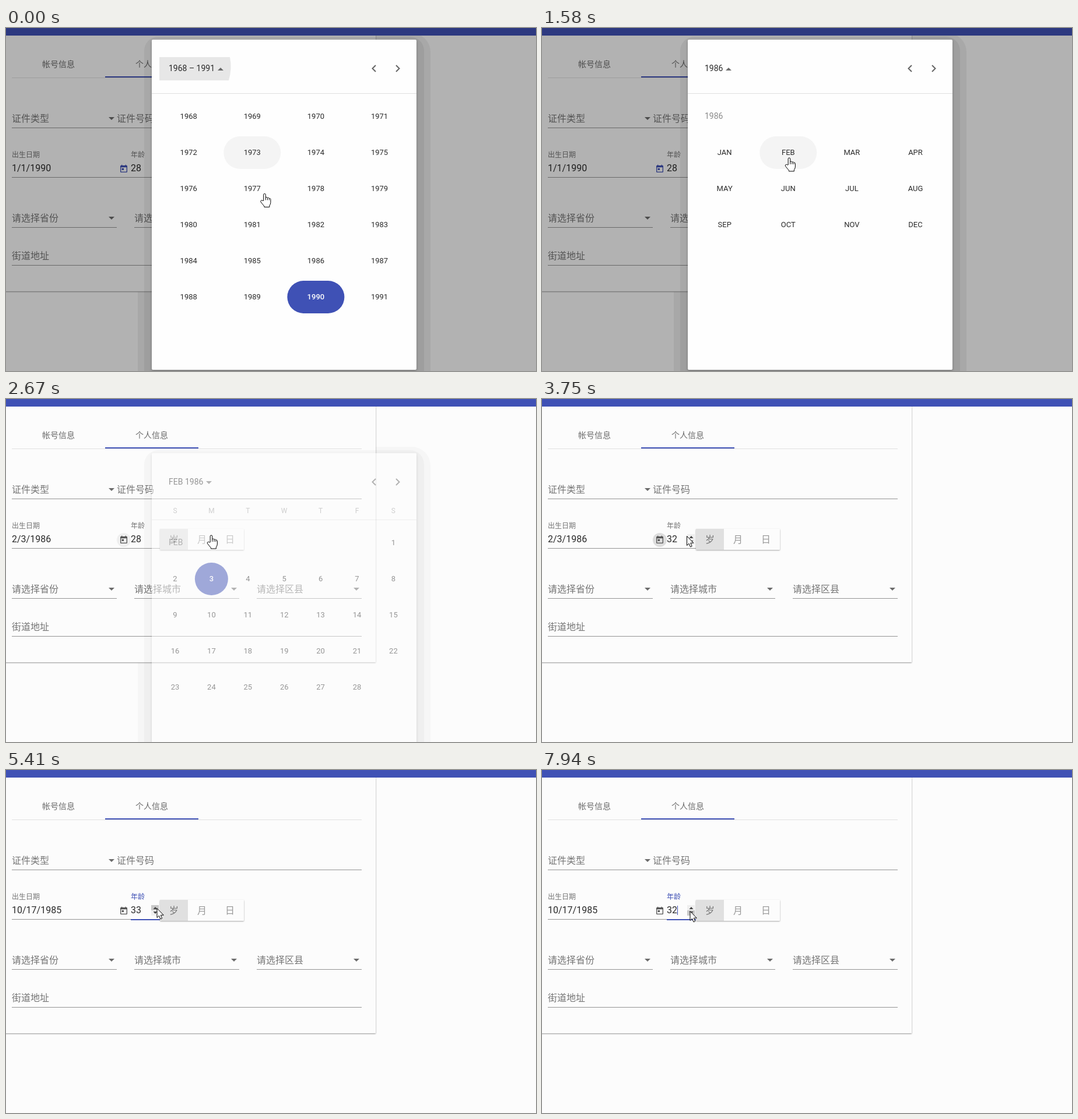
Write an HTML page that moves like this. It is 909x589 px and loops after 8 s.

```html
<!DOCTYPE html>
<html lang="zh">
<head>
<meta charset="utf-8">
<style>
html, body { margin: 0; width: 100%; height: 100%; overflow: hidden; background: #fcfcfc; }
svg { display: block; width: 909px; height: 589px; }
text { font-family: Roboto, "Noto Sans CJK SC", "Noto Sans CJK", sans-serif; white-space: pre; }
.cjk { font-family: "Noto Sans CJK SC", "Noto Sans CJK", sans-serif; font-weight: 300; }
.card { filter: drop-shadow(0 1px 1px rgba(0,0,0,.42)); }
.toggle { filter: drop-shadow(0 1px 1px rgba(0,0,0,.34)); }
.sheet { filter: drop-shadow(0 2px 2px rgba(0,0,0,.25)); }
</style>
</head>
<body>
<svg id="stage" viewBox="0 0 909 589"></svg>
<script>
const LOOP = 8000, BLUE = '#3f51b5', INK = '#2b2b2b', GREY = '#757575', LINE = '#949494';
const MONTHS = 'JAN FEB MAR APR MAY JUN JUL AUG SEP OCT NOV DEC'.split(' ');

// Markup helpers
const rect = (x, y, w, h, fill, extra = '') =>
  `<rect x="${x}" y="${y}" width="${w}" height="${h}" fill="${fill}" ${extra}/>`;
const label = (x, y, s, size, fill, extra = '') =>
  `<text x="${x}" y="${y}" font-size="${size}" fill="${fill}" ${extra}>${s}</text>`;
const cjk = (x, y, s, size = 16, fill = GREY, extra = '') =>
  label(x, y, s, size, fill, `class="cjk" ${extra}`);
const mid = (x, y, s, size = 13, fill = INK, extra = '') =>
  label(x, y, s, size, fill, `text-anchor="middle" ${extra}`);
const tri = (x, y, r, h, fill = '#6b6b6b') =>
  `<path d="M${x - r} ${y}h${2 * r}l${-r} ${h}z" fill="${fill}"/>`;
const pill = (x, y, w, fill, extra = '') =>
  rect(x - w / 2, y - 28, w, 56, fill, `rx="28" ${extra}`);
const range = (n, fn) => Array.from({ length: n }, (_, i) => fn(i)).join('');

const wideX = i => 313.2 + 109.1 * (i % 4);
const dayX = i => 290 + 62.4 * (i % 7);
const rowY = (first, i, cols) => first + 62 * Math.floor(i / cols);

const select = (x, w, y, s) =>
  cjk(x, y - 10, s) + rect(x, y, w, 1, LINE) + tri(x + 171, y - 18, 5, 5);

const form = `
  ${rect(-20, -10, 654, 462, '#fcfcfc', 'class="card"')}
  ${rect(0, 0, 909, 13, BLUE)}
  ${cjk(62, 67, '帐号信息', 14, '#6c6c6c')}${cjk(222, 67, '个人信息', 14, '#6c6c6c')}
  ${rect(10, 85, 600, 1, '#e0e0e0')}${rect(170, 83, 160, 2, BLUE)}
  ${select(10, 180, 171, '证件类型')}
  ${cjk(190, 161, '证件号码')}${rect(190, 171, 420, 1, LINE)}
  ${cjk(10, 222, '出生日期', 12)}${cjk(214, 222, '年龄', 12, GREY, 'id="ageLabel"')}
  ${rect(10, 256, 254, 1, LINE)}
  ${rect(214, 256, 50, 2, BLUE, 'id="focusLine"')}
  ${label(10, 246, '', 16, INK, 'id="birth"')}${label(214, 246, '', 16, INK, 'id="age"')}
  <circle id="iconHalo" cx="202" cy="242" r="12"/>
  <path id="icon" transform="translate(194 234) scale(.667)" d="M19 3h-1V1h-2v2H8V1H6v2H5q-2 0-2 2v14q0 2 2 2h14q2 0 2-2V5q0-2-2-2zm0 16H5V8h14zM7 10h5v5H7z"/>
  ${rect(232, 233, 1, 16, BLUE, 'id="caret"')}
  <g id="spinner">
    ${rect(249, 232, 13, 18, '#efefef')}
    ${rect(249, 232, 13, 9, '#c8c8c8', 'id="spinHover"')}
    ${tri(256, 239, 3.5, -4, '#444')}${tri(256, 243, 3.5, 4, '#444')}
  </g>
  ${rect(264, 223, 144, 36, '#fcfcfc', 'rx="1" class="toggle"')}
  ${rect(264, 223, 48, 36, '#e0e0e0')}
  ${cjk(280, 247, '岁')}${cjk(328, 247, '月', 16, '#999')}${cjk(376, 247, '日', 16, '#999')}
  ${select(10, 180, 342, '请选择省份')}
  ${select(220, 180, 342, '请选择城市')}
  ${select(430, 180, 342, '请选择区县')}
  ${cjk(10, 397, '街道地址')}${rect(10, 407, 600, 1, LINE)}`;

const yearsView = `
  ${pill(wideX(2), 462, 98, BLUE)}
  ${label(279, 74, '1968 – 1991', 14, INK)}${tri(368, 73, 5, -5)}
  ${rect(250, 112, 454, 1, '#e0e0e0')}
  ${range(24, i => mid(wideX(i), rowY(156, i, 4), 1968 + i, 13,
    i === 22 ? '#fff' : INK, i === 22 ? 'font-weight="500"' : ''))}`;

const monthsView = `
  ${label(279, 74, '1986', 14, INK)}${tri(320, 73, 5, -5)}
  ${rect(250, 112, 454, 1, '#e0e0e0')}
  ${label(279, 156, '1986', 14, '#8a8a8a')}
  ${range(12, i => mid(wideX(i), rowY(218, i, 4), MONTHS[i]))}`;

const daysView = `
  ${pill(dayX(1), 236, 57, BLUE, 'id="picked"')}
  ${label(279, 74, 'FEB 1986', 14, INK)}${tri(348, 68, 5, 5)}
  ${range(7, i => mid(dayX(i), 123, 'SMTWTFS'[i], 12, '#9e9e9e'))}
  ${rect(250, 134, 454, 1, '#e0e0e0')}
  ${label(279, 178, 'FEB', 14, '#808080')}
  ${range(28, i => mid(dayX(i + 6), rowY(178, i + 6, 7), i + 1, 13, INK, i === 2 ? 'id="third"' : ''))}`;

const picker = `
  <g id="dialog">
    <g clip-path="url(#offCard)"><g class="slide">
      ${rect(226, 9, 502, 660, '#000', 'rx="32" opacity=".055"')}
    </g></g>
    <g class="slide">
      ${rect(237, 15, 480, 640, '#000', 'rx="24" opacity=".06"')}
      ${rect(250, 20, 454, 567, '#fefefe', 'rx="2" class="sheet"')}
      <path id="ripple" d="M263 50H384Q388 70 382 90H263Z" fill="#e7e7e7"/>
      ${pill(0, 0, 98, '#f4f4f4', 'id="hover"')}
      <g id="years">${yearsView}</g>
      <g id="months">${monthsView}</g>
      <g id="days">${daysView}</g>
      <path d="M634 64l-5.5 5.5 5.5 5.5M669 64l5.5 5.5-5.5 5.5" fill="none" stroke="#666" stroke-width="2"/>
    </g>
  </g>`;

const cursors = `
  <g id="cursor" fill="#fff" stroke="#000" stroke-linejoin="round">
    <g id="hand">
      <path d="M-1.8 12V1.8a1.8 1.8 0 0 1 3.6 0V7a1.7 1.7 0 0 1 3.2.6a1.6 1.6 0 0 1 2.9.9a1.5 1.5 0 0 1 2.5 1.2V15q0 3-2 5.5V23H-.6V21.5L-6.3 14.5q-1.2-1.8.3-2.8t2.7.3Z"/>
      <path d="M1.8 7v4M5 8v3M7.9 9v2" fill="none"/>
    </g>
    <path id="arrow" d="M.5.5V16.5L4 13.2 6.5 19 9.2 17.8 6.8 12.2H11.8Z"/>
  </g>`;

document.getElementById('stage').innerHTML = `
  <defs><clipPath id="offCard"><path d="M634 13H909V589H0V453H634Z"/></clipPath></defs>
  ${rect(0, 0, 909, 589, '#fcfcfc')}${form}
  ${rect(0, 0, 909, 589, '#000', 'id="backdrop" opacity=".295"')}
  ${picker}${cursors}`;

const $ = id => document.getElementById(id);
const set = (id, name, value) => $(id).setAttribute(name, value);
const show = (id, on) => set(id, 'display', on ? 'inline' : 'none');
const slides = document.querySelectorAll('.slide');

// Timelines: [start, ...values]; each entry holds until the next
const births = [[0, '1/1/1990'], [2670, '2/3/1986'], [5010, '10/17/1985'], [6360, '10/17/1986'], [7430, '10/17/1985']];
const ages = [[0, 28], [2790, 32], [4460, 33], [5840, 32], [6780, 33], [7820, 32]];
const views = [[0, 'years'], [1000, 'months'], [2130, 'days']];
const hovers = [
  [0, wideX(1), 214, 98], [150, wideX(1), 276, 98], [290, 0, 0, 0],
  [740, wideX(2), 400, 98], [1000, 0, 0, 0], [1440, wideX(1), 214, 98],
  [2130, dayX(2), 236, 57], [2385, 0, 0, 0], [2520, dayX(1), 236, 57], [2670, 0, 0, 0]];
const ripples = [[0, 1], [150, .6], [290, .25], [430, 0]];
const closing = [[0, 0], [2670, .515], [2790, .93], [2910, 1]];
const spinRows = [[0, -1], [4030, 0], [5530, 1], [6500, 0], [7560, 1]];
const focus = [[0, 0], [4460, .5], [4600, 1]];
const hold = (list, t) => list.findLast(e => t >= e[0]);

// Pointer legs: first step, last step, step count, destination
const legs = [
  [150, 430, 3, 536, 391], [1160, 1580, 4, 424, 223], [1730, 1730, 1, 423, 222],
  [2250, 2520, 3, 352, 234], [3180, 3750, 5, 248, 235], [4030, 4180, 2, 258, 235],
  [5410, 5410, 1, 258.5, 237], [5530, 5530, 1, 255, 243],
  [6500, 6640, 2, 255, 236], [7560, 7690, 2, 253.5, 242]];

function pointer(t) {
  let x = 443.5, y = 284.5;
  for (const [start, end, count, toX, toY] of legs) {
    if (t < start) break;
    const gap = (end - start) / (count - 1) || 1;
    const p = Math.min(1, (1 + Math.floor((t - start) / gap + .001)) / count);
    const ease = p * p * (3 - 2 * p);
    x += (toX - x) * ease;
    y += (toY - y) * ease;
  }
  return [x, y];
}

function draw(t) {
  const [ageTime, age] = hold(ages, t);
  const focused = hold(focus, t)[1];
  $('birth').textContent = hold(births, t)[1];
  $('age').textContent = age;
  set('ageLabel', 'fill', focused ? BLUE : GREY);
  set('focusLine', 'x', 239 - 25 * focused);
  set('focusLine', 'width', 50 * focused);
  show('caret', focused && (t - ageTime) % 1060 < 530);
  set('icon', 'fill', t < 2670 ? BLUE : '#555');
  set('iconHalo', 'opacity', t < 2670 || focused ? 0 : t < 2790 ? .05 : .12);

  const row = hold(spinRows, t)[1];
  show('spinner', t >= 3600);
  show('spinHover', row >= 0);
  set('spinHover', 'y', 232 + 9 * row);

  const closed = hold(closing, t)[1];
  const view = hold(views, t)[1];
  show('backdrop', t < 2670);
  show('dialog', closed < 1);
  set('dialog', 'opacity', 1 - closed);
  slides.forEach(s => s.setAttribute('transform', `translate(0 ${Math.round(closed * 141.75)})`));
  for (const id of ['years', 'months', 'days']) show(id, id === view);
  show('picked', closed > 0);
  set('third', 'fill', closed ? '#fff' : INK);
  set('third', 'font-weight', closed ? 500 : 400);
  set('ripple', 'opacity', hold(ripples, t)[1]);

  const [, hx, hy, hw] = hold(hovers, t);
  set('hover', 'x', hx - hw / 2);
  set('hover', 'y', hy - 28);
  set('hover', 'width', hw);

  const [x, y] = pointer(t);
  set('cursor', 'transform', `translate(${x} ${y})`);
  show('hand', t < 3600);
  show('arrow', t >= 3600);
}

const began = performance.now();
function tick() {
  draw((performance.now() - began) % LOOP);
  requestAnimationFrame(tick);
}
tick();
</script>
</body>
</html>
```
